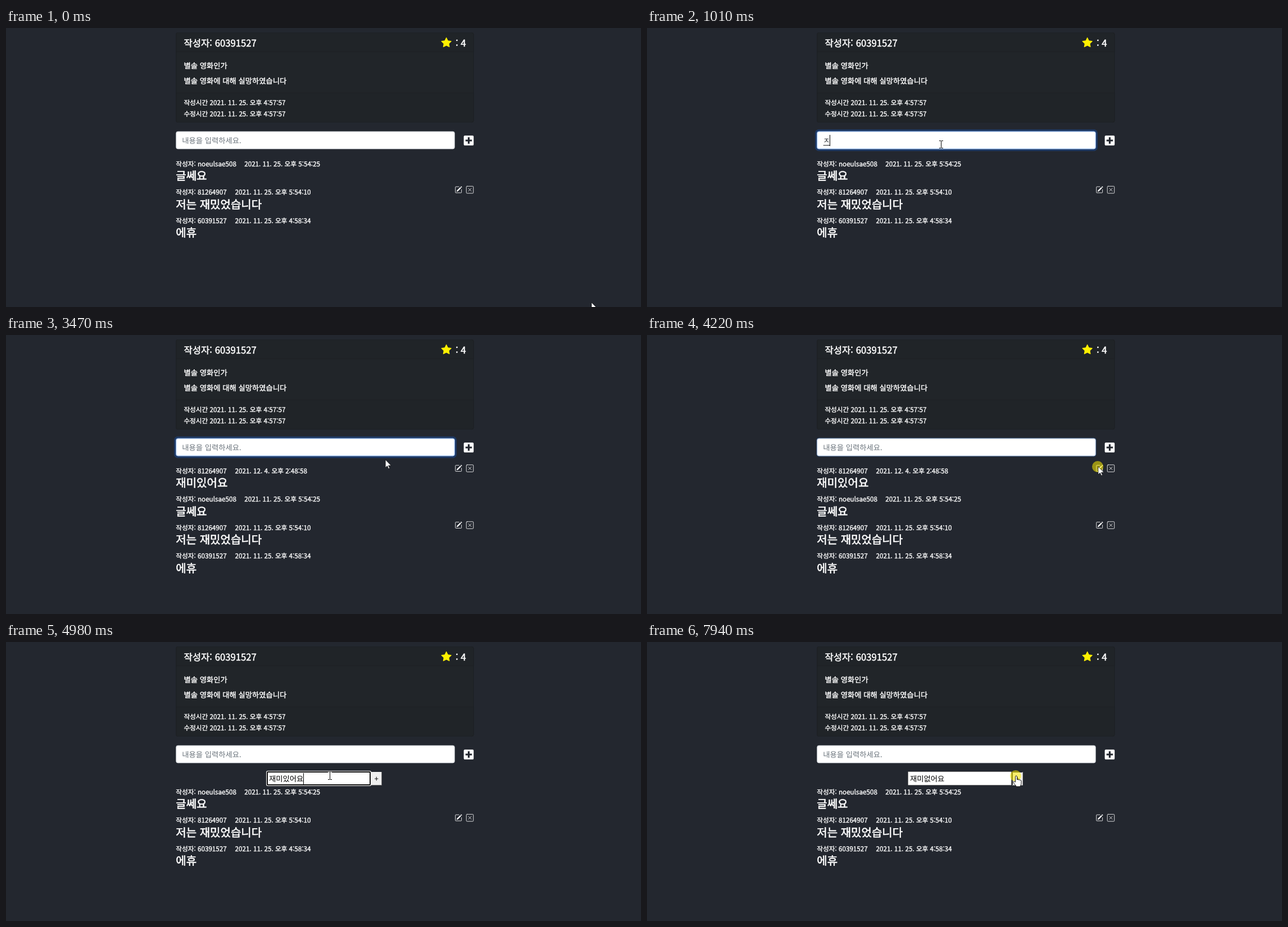
Recreate the animation shown at these times as an HTML page. Size 1130x496 px, loop 8000 ms.

```html
<!DOCTYPE html>
<html lang="ko">
<head>
<meta charset="utf-8">
<title>댓글</title>
<style>
html, body { margin: 0; width: 100%; height: 100%; overflow: hidden; background: #23272f; }
svg { display: block; width: 1130px; height: 496px; }
text { font-family: "Noto Sans CJK KR", "Noto Sans KR", "Noto Sans CJK", "Noto Sans CJK JP", sans-serif; font-weight: 500; fill: #fff; stroke: #fff; stroke-width: .03em; white-space: pre; text-rendering: geometricPrecision; }
.h { font-size: 16.67px; }
.b { font-size: 13.33px; }
.s { font-size: 11.67px; }
.c { font-size: 20px; }
.field { font-size: 13.33px; font-weight: 400; fill: #212529; stroke: none; }
.hint { fill: #6c757d; }
.black { fill: #000; }
</style>
</head>
<body>
<svg viewBox="0 0 1130 496" xmlns="http://www.w3.org/2000/svg">
  <defs>
    <g id="icons" fill="#fff">
      <g transform="translate(798.5 230.4) scale(.8333)">
        <path d="M15.502 1.94a.5.5 0 0 1 0 .706L14.459 3.69l-2-2L13.502.646a.5.5 0 0 1 .707 0l1.293 1.293zm-1.75 2.456-2-2L4.939 9.21a.5.5 0 0 0-.121.196l-.805 2.414a.25.25 0 0 0 .316.316l2.414-.805a.5.5 0 0 0 .196-.12z"/>
        <path d="M14.5 7.5v6a1 1 0 0 1-1 1h-11a1 1 0 0 1-1-1v-11a1 1 0 0 1 1-1H9" fill="none" stroke="#fff" stroke-linecap="round"/>
      </g>
      <g transform="translate(818.8 230.4) scale(.8333)" fill="none" stroke="#fff" stroke-linecap="round">
        <rect x=".5" y=".5" width="15" height="15" rx="1.5"/>
        <path d="M5 5l6 6M11 5l-6 6"/>
      </g>
    </g>
  </defs>
  <rect width="1130" height="496" fill="#23272f"/>

  <rect x="302.3" y="8" width="530" height="160" rx="3.3" fill="#212529"/>
  <path d="M302.3 42V11.3a3.3 3.3 0 0 1 3.3-3.3h523.4a3.3 3.3 0 0 1 3.3 3.3V42zM302.3 116h530v48.7a3.3 3.3 0 0 1-3.3 3.3H305.6a3.3 3.3 0 0 1-3.3-3.3z" fill="#202428"/>
  <path d="M302.3 42.5h530M302.3 115.5h530" stroke="#1d2024"/>
  <rect x="302.8" y="8.5" width="529" height="159" rx="3" fill="none" stroke="#1d2024"/>
  <text class="h" x="316.4" y="32.7">작성자: 60391527</text>
  <path transform="translate(774.4 16.3) scale(1.15)" fill="#fff000" d="M3.612 15.443c-.386.198-.824-.149-.746-.592l.83-4.73L.173 6.765c-.329-.314-.158-.888.283-.95l4.898-.696L7.538.792c.197-.39.73-.39.927 0l2.184 4.327 4.898.696c.441.062.612.636.282.95l-3.522 3.356.83 4.73c.078.443-.36.79-.746.592L8 13.187z"/>
  <text class="h" x="818.5" y="32.7" text-anchor="end">: 4</text>
  <text class="b" x="316.4" y="72.2">별솔 영화인가</text>
  <text class="b" x="316.4" y="98.6">별솔 영화에 대해 실망하였습니다</text>
  <text class="s" x="316.4" y="136.7">작성시간 2021. 11. 25. 오후 4:57:57</text>
  <text class="s" x="316.4" y="156.7">수정시간 2021. 11. 25. 오후 4:57:57</text>

  <rect id="ring" fill="#0d6efd"/>
  <g stroke-width=".83">
    <rect x="302.75" y="184.1" width="495.5" height="30.8" rx="3" fill="#fff" stroke="#ced4da"/>
    <rect id="blue" x="302.75" y="184.1" width="495.5" height="30.8" rx="3" fill="none" stroke="#86b7fe"/>
  </g>
  <text id="hint" class="field hint" x="313.2" y="205">내용을 입력하세요.</text>
  <text id="entry" class="field" x="313.2" y="205"></text>
  <path id="entryMark" stroke="#212529"/>
  <path id="entryCaret" stroke="#000"/>

  <rect x="814.6" y="191.2" width="17.6" height="17.6" rx="1.9" fill="#fff"/>
  <path d="M817.7 200h11.4M823.4 194.3v11.4" stroke="#23272f" stroke-width="3.2"/>

  <g id="list"></g>

  <g id="editor">
    <g id="focus">
      <rect x="463" y="229" width="187" height="27" rx="2.5" fill="#fff"/>
      <rect x="464" y="230" width="185" height="25" rx="2" fill="#101010"/>
    </g>
    <rect id="box" fill="#fff"/>
    <text id="edit" class="field black" x="468" y="248"></text>
    <path id="editMark" stroke="#000"/>
    <path id="editCaret" stroke="#000"/>
    <rect x="650" y="231" width="18.5" height="23.5" fill="#efefef"/>
    <path id="lit" d="M650.5 254V231.5H668" fill="none"/>
    <path id="shade" d="M668.5 231V254.5H650" fill="none"/>
    <text class="field black" x="659.2" y="248" text-anchor="middle">+</text>
  </g>

  <circle id="click" r="10" fill="#ffee00" fill-opacity=".55"/>
  <path id="arrow" d="M0 0V14l3.3-3 2.2 5 2-.9-2.2-4.8H10z" fill="#fff" stroke="#000" stroke-width=".6"/>
  <path id="beam" d="M-3.5-6.5h2.5q1 0 1 1 0-1 1-1h2.5M0-5.5v11M-3.5 6.5h2.5q1 0 1-1 0 1 1 1h2.5" fill="none" stroke="#fff" style="mix-blend-mode:difference"/>
  <path id="hand" d="M-1.5 11V1.5a1.5 1.5 0 0 1 3 0V7a1.4 1.4 0 0 1 2.7.4 1.4 1.4 0 0 1 2.6.5 1.3 1.3 0 0 1 2.2 1V13c0 3-1.5 4-2 6H0c-.6-2.5-4-5-5-7.5-.5-2 1.5-2.2 2.3-1z" fill="#fff" stroke="#000" stroke-width=".9"/>
</svg>
<script>
const LOOP = 8000, SYLLABLE = 13.33 * 0.92, ROW = 50.5;
const $ = id => document.getElementById(id);
const show = (id, on) => $(id).setAttribute("display", on ? "inline" : "none");
const set = (id, attrs) => { for (const k in attrs) $(id).setAttribute(k, attrs[k]); };
const within = (t, a, b) => t >= a && t < b;
const ease = p => p * p * (3 - 2 * p);
const clamp = p => Math.min(1, Math.max(0, p));

const comments = [
  ["81264907", 407.6, "2021. 12. 4. 오후 2:48:58", "재미있어요", true],
  ["noeulsae508", 424.2, "2021. 11. 25. 오후 5:54:25", "글쎄요", false],
  ["81264907", 407.6, "2021. 11. 25. 오후 5:54:10", "저는 재밌었습니다", true],
  ["60391527", 407.6, "2021. 11. 25. 오후 4:58:34", "에휴", false]
];
$("list").innerHTML = comments.map(([name, x, date, words, own]) => `<g>
  <text class="s" x="302.3" y="245.8">작성자: ${name}</text>
  <text class="s" x="${x}" y="245.8">${date}</text>
  <text class="c" x="302.3" y="270.2">${words}</text>
  ${own ? '<use href="#icons"/>' : ""}</g>`).join("");
const rows = [...$("list").children];

// Evenly spaced keystrokes; each item is the whole field content.
const spread = (from, to, items) =>
  items.map((s, i) => [from + (to - from) * i / (items.length - 1), s]);
const entryKeys = [
  [0, ""], [1010, "ㅈ"],
  ...spread(1540, 2330, ["재", "잼", "재미", "재밍", "재미이", "재미있", "재미있ㅇ", "재미있어", "재미있엉"]),
  [2400, "재미있어요"], [2600, ""]
];
const editKeys = [
  [0, "재미있어요"], [5390, "재미있어"], [5590, "재미있"], [5930, "재미"],
  ...spread(6120, 6660, ["ㅇ", "어", "업", "없", "없ㅇ", "없어", "없어요"].map(s => "재미" + s))
];
const typed = (keys, t) => keys.filter(k => k[0] <= t).pop()[1];

// Pointer moves: first step, last step, step count, end point.
const moves = [
  [70, 750, 10, 523, 207],
  [3070, 3750, 11, 791, 233],
  [3950, 4020, 2, 803, 234],
  [4290, 4850, 9, 576, 237.5],
  [7060, 7190, 2, 605, 237.5],
  [7390, 7870, 7, 657, 238]
];
function pointer(t) {
  let x = 1042, y = 488;
  for (const [from, to, count, ex, ey] of moves) {
    if (t < from) break;
    const step = Math.floor((t - from) * (count - 1) / (to - from) + 1e-6) + 1;
    const p = ease(clamp(step / count));
    x += (ex - x) * p;
    y += (ey - y) * p;
  }
  return [x, y];
}

function field(id, words, x0, top, caretOn, composing) {
  $(id).textContent = words;
  const end = x0 + words.length * SYLLABLE;
  const x = Math.floor(end) + 0.5, y = top + 18.5;
  set(id + "Caret", { d: `M${x} ${top}v20` });
  set(id + "Mark", { d: `M${end - SYLLABLE + 0.5} ${y}H${end}` });
  show(id + "Caret", caretOn);
  show(id + "Mark", composing && words);
}

function draw(t) {
  const editing = t >= 4290;
  const posted = t >= 2670;

  const glow = ease(clamp((t - 770) / 130)) - ease(clamp((t - 4145) / 140));
  const s = 3.33 * glow;
  set("ring", { x: 302.33 - s, y: 183.67 - s, width: 496.33 + 2 * s, height: 31.67 + 2 * s, rx: 3.3 + s, opacity: 0.25 * glow });
  set("blue", { opacity: glow });

  const words = typed(entryKeys, t);
  show("hint", !words);
  field("entry", words, 313.2, 190, within(t, 820, 3070) || within(t, 3600, 4130), t < 2530);

  rows.forEach((row, i) => {
    const slot = posted && !editing ? i : i - 1;
    const y = slot * ROW + (editing ? 25 : 0);
    row.setAttribute("transform", `translate(0 ${y})`);
    row.setAttribute("display", slot < 0 ? "none" : "inline");
  });

  show("editor", editing);
  const focused = within(t, 4850, 7870);
  show("focus", focused);
  set("box", focused
    ? { x: 466, y: 232, width: 181, height: 21, rx: 0, stroke: "none" }
    : { x: 464.5, y: 230.5, width: 184, height: 24, rx: 1, stroke: "#767676" });
  field("edit", typed(editKeys, t), 468, 233,
    within(t, 4850, 5390) || within(t, 5930, 7060), within(t, 6120, 7870));
  const pressed = t >= 7870;
  set("lit", { stroke: pressed ? "#333" : "#f4f4f4" });
  set("shade", { stroke: pressed ? "#b5b5b5" : "#777" });

  const [x, y] = pointer(t);
  const overButton = editing && within(x, 650, 669) && within(y, 231, 255);
  const overField = within(x, 302, 799) && within(y, 184, 215) ||
    editing && within(x, 464, 650) && within(y, 230, 255);
  const kind = overButton ? "hand" : overField ? "beam" : "arrow";
  const [px, py] = kind === "beam" ? [Math.round(x) + 0.5, Math.round(y)] : [x, y];
  for (const id of ["arrow", "beam", "hand"]) {
    show(id, id === kind);
    set(id, { transform: `translate(${px} ${py})` });
  }
  set("click", { cx: x - 1, cy: y });
  show("click", [[750, 880], [4160, 4290], [4850, 4980], [7870, LOOP]].some(([a, b]) => within(t, a, b)));
}

function tick() {
  draw(performance.now() % LOOP);
  requestAnimationFrame(tick);
}
tick();
</script>
</body>
</html>
```
